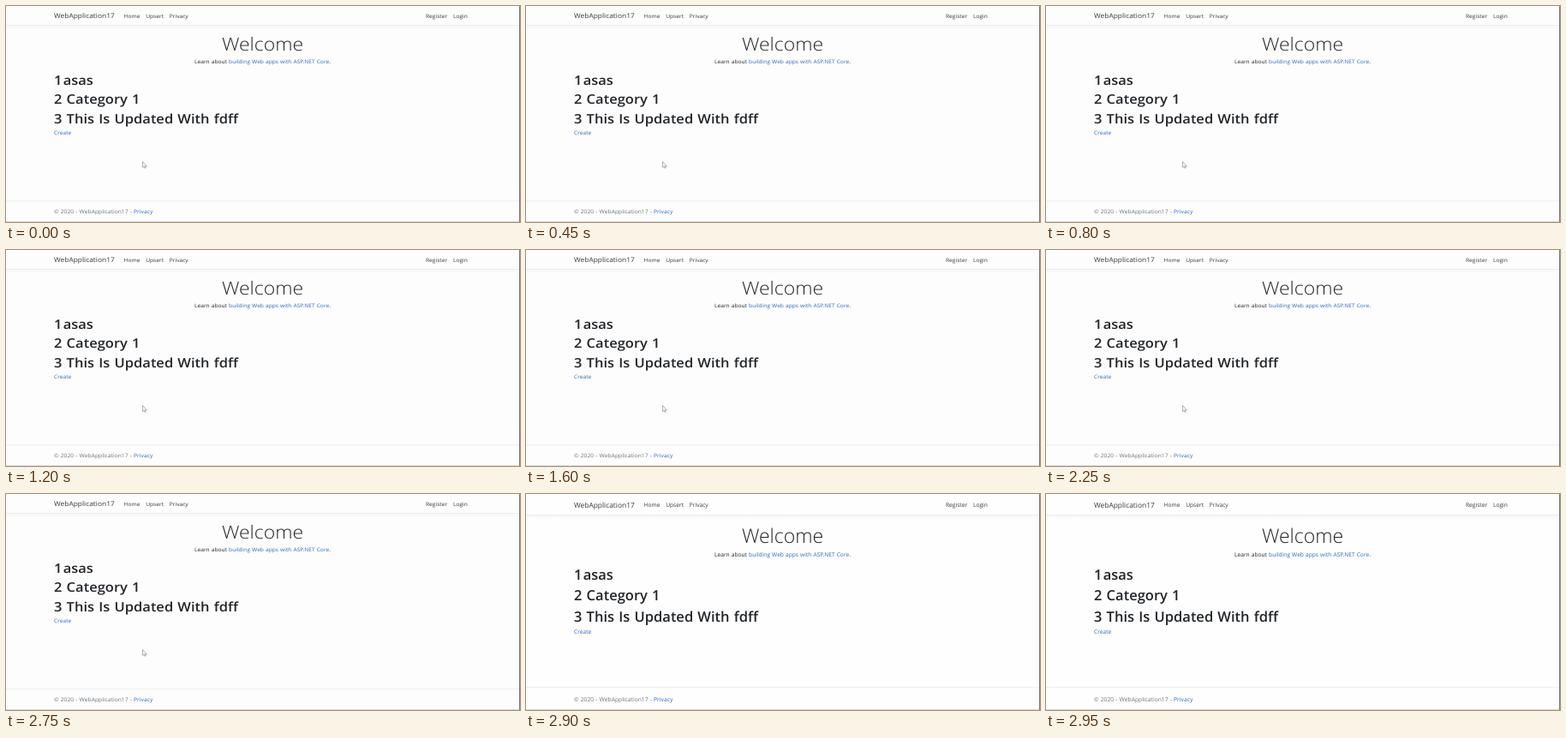
Animation of 600 by 252 pixels, one loop 3 s. Source, as an HTML page:

```html
<!DOCTYPE html>
<html lang="en">
<head>
<meta charset="utf-8">
<title>Welcome</title>
<style>
  html, body { margin: 0; width: 100%; height: 100%; overflow: hidden; background: #fdfdfd; }
  svg { display: block; width: 600px; height: 252px; font: 6.65px "Open Sans", "Noto Sans", sans-serif; fill: #212529; }
  text { word-spacing: .055em; text-rendering: geometricPrecision; }
  rect { shape-rendering: crispEdges; }
  .nav { fill: #343a40; }
  .brand { font-size: 8.4px; }
  .title { font-size: 23px; font-weight: 300; }
  .rows { font-size: 16.5px; font-weight: 600; }
  .link { fill: #2a6bbf; }
  .muted { font-size: 6.75px; fill: #6c757d; }
  .rule { fill: #ebedef; }
</style>
</head>
<body>
<svg viewBox="0 0 600 252">
  <defs>
    <linearGradient id="shadow" x2="0" y2="1">
      <stop stop-opacity=".025"/>
      <stop offset="1" stop-opacity="0"/>
    </linearGradient>
  </defs>
  <rect id="page" width="600" height="252"/>

  <g id="main">
    <rect y="25" width="599" height="5" fill="url(#shadow)"/>
    <rect class="rule" y="24" width="599" height="1"/>
    <g class="nav">
      <text class="brand" x="56" y="15.6">WebApplication17</text>
      <text x="137.6" y="15">Home</text>
      <text x="163.2" y="15">Upsert</text>
      <text x="190.8" y="15">Privacy</text>
      <text x="490" y="15">Register</text>
      <text x="522" y="15">Login</text>
    </g>
    <g text-anchor="middle">
      <text class="title" x="299.5" y="56.5">Welcome</text>
      <text x="299.5" y="72.6">Learn about <tspan class="link">building Web apps with ASP.NET Core</tspan>.</text>
    </g>
    <g class="rows">
      <text x="56" y="99.8">1 <tspan dx="-4">asas</tspan></text>
      <text x="56" y="124.3">2 Category 1</text>
      <text x="56" y="148.8">3 This Is Updated With fdff</text>
    </g>
    <text class="link" x="56" y="163.4">Create</text>
  </g>

  <g id="footer">
    <rect class="rule" y="-26" width="599" height="1"/>
    <text class="muted" x="56" y="-9.5">© 2020 - WebApplication17 - <tspan class="link">Privacy</tspan></text>
  </g>

  <path id="cursor" d="M159.5 181.5v7l1.6-1.5 1.1 2.3 1-.5-1-2.2h2z" fill="#fff" stroke="#888" stroke-width=".7"/>
  <rect y="251" width="600" height="1" fill="#d8d8d8"/>
  <rect x="599" width="1" height="252" fill="#777"/>
</svg>
<script>
  const LOOP = 3000, RELOAD = 2900;
  const [page, main, footer, cursor] =
    ["page", "main", "footer", "cursor"].map(id => document.getElementById(id));

  // Until the reload the page is slightly squashed, with its footer pinned to the bottom.
  function draw(now) {
    const reloaded = now % LOOP >= RELOAD;
    const scale = reloaded ? 1 : 0.92;
    main.setAttribute("transform", `scale(1 ${scale})`);
    footer.setAttribute("transform", `translate(0 251) scale(1 ${scale})`);
    page.setAttribute("fill", reloaded ? "#fefefe" : "#fdfdfd");
    cursor.setAttribute("visibility", reloaded ? "hidden" : "visible");
    requestAnimationFrame(draw);
  }
  draw(performance.now());
</script>
</body>
</html>
```
